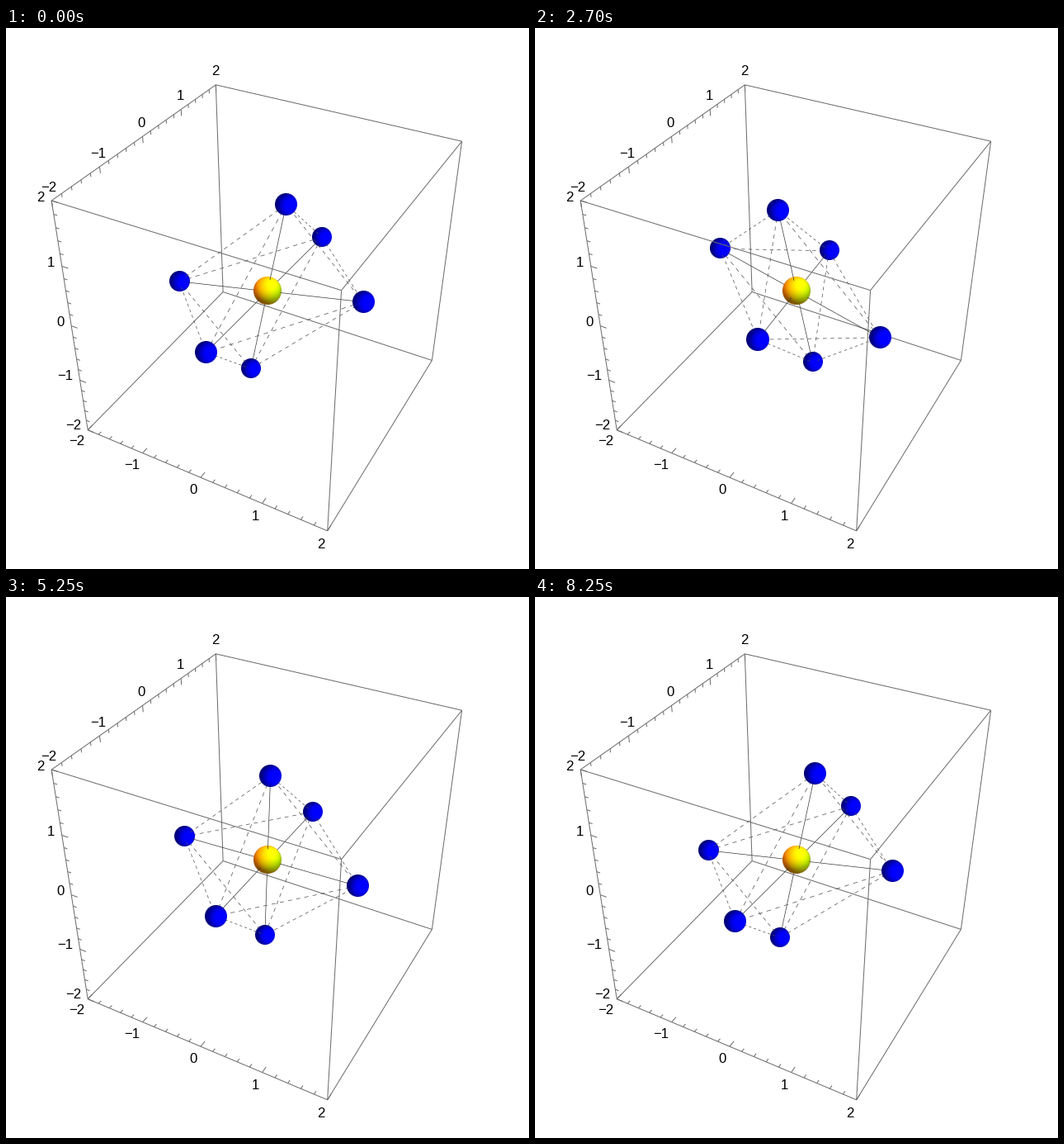
Animation of 634x655 px, one loop 9 s. Source, as a matplotlib script:

```python
import itertools

import matplotlib.pyplot as plt
import numpy as np
from matplotlib.animation import FuncAnimation

W, H, DPI = 634, 655, 64
PT = 72 / DPI                 # points per pixel
FRAMES, INTERVAL = 60, 150
HOLD, STEPS = 5, 49           # still frames at the start, steps of two swings
HALF = 2                      # the box runs from -HALF to HALF
ARM = np.sqrt(2)              # distance of an outer ball from the centre
SWING = 0.188                 # largest shear of an outer ball

plt.rcParams["font.family"] = "Liberation Sans"
plt.rcParams["lines.scale_dashes"] = False
plt.rcParams["lines.dash_capstyle"] = "butt"

# Camera looking at the origin, with the z axis upright
MIDDLE = np.array([317, 318.8])
SCALE = 83.5                  # pixels per unit at the origin
EYE = 2 * HALF * np.array([1.3, -2.4, 2])
FORWARD = EYE / np.linalg.norm(EYE)
RIGHT = np.cross((0, 0, 1), FORWARD)
RIGHT /= np.linalg.norm(RIGHT)
UP = np.cross(FORWARD, RIGHT)


def project(p):
    """Pixel position and relative distance from the eye."""
    depth = 1 - np.dot(p, FORWARD) / np.linalg.norm(EYE)
    offset = np.array([np.dot(p, RIGHT), -np.dot(p, UP)])
    return MIDDLE + SCALE * offset / depth, depth


LIGHTS = [                    # tint and direction towards the light
    ((0, .18, .5), (1.5, -.5, 1.5)),
    ((.18, .5, .18), (1.5, 1.5, 2.5)),
    ((.5, .18, 0), (-.5, 1.5, 1.5)),
    ((0, 0, .18), (-.5, -.5, 1.5)),
]
AMBIENT = (.5, .28, .36)


def ball_image(color, n=160):
    """Lit ball as an RGBA picture."""
    x, y = np.meshgrid(*[(np.arange(n) + .5) / n * 2 - 1] * 2)
    rho = np.hypot(x, y)
    k = 1 / np.maximum(rho, 1)
    normal = np.dstack([x * k, -y * k, np.sqrt(np.clip(1 - rho**2, 0, 1))])
    light = np.ones((n, n, 3)) * AMBIENT
    for tint, d in LIGHTS:
        facing = np.clip(normal @ (np.array(d) / np.linalg.norm(d)), 0, 1)
        light += facing[..., None] * np.array(tint)
    rgb = np.clip(light * color, 0, 1)
    return np.dstack([rgb, (rho <= 1).astype(float)])


fig = plt.figure(figsize=(W / DPI, H / DPI), dpi=DPI, facecolor="white")
ax = fig.add_axes([0, 0, 1, 1])
ax.axis("off")


def draw_line(a, b, color=".42", width=1.0, z=0):
    return ax.plot([a[0], b[0]], [a[1], b[1]], color=color, lw=width * PT,
                   solid_capstyle="butt", zorder=z)[0]


def draw_box():
    corners = list(itertools.product((-HALF, HALF), repeat=3))
    nearest = min(corners, key=lambda c: project(c)[1])
    for a, b in itertools.combinations(corners, 2):
        if sum(i != j for i, j in zip(a, b)) == 1:
            draw_line(project(a)[0], project(b)[0], z=20 if nearest in (a, b) else 0)


def draw_label(value, edge, out):
    """Number beside an edge point, its own size pushing it outwards."""
    text = str(value).replace("-", "\u2212")
    half_size = np.array([4.8 * len(text), 8])
    x, y = edge + out * (9.5 + half_size)
    ax.text(x, y + 6, text, color="black", fontsize=16.7 * PT,
            ha="center", va="baseline", zorder=21)


def draw_axis(axis, edge, inward):
    """Ticks along one edge, pointing inward, with labels on the other side."""
    for i in range(-5 * HALF, 5 * HALF + 1):
        p = np.array(edge, float)
        p[axis] = i / 5
        a = project(p)[0]
        d = project(p + np.array(inward) * .1)[0] - a
        d /= np.hypot(*d)
        major = i % 5 == 0
        draw_line(a, a + d * (8 if major else 4.5))
        if major:
            draw_label(i // 5, a, -d)


draw_box()
draw_axis(0, (0, -HALF, -HALF), (0, 1, 0))
draw_axis(1, (-HALF, 0, HALF), (0, 0, -1))
draw_axis(2, (-HALF, -HALF, 0), (1, 0, 0))


class Ball:
    def __init__(self, color, radius):
        self.radius = radius
        self.image = ax.imshow(ball_image(color), aspect="auto")

    def move(self, p):
        self.p = np.array(p, float)
        self.xy, self.depth = project(self.p)
        (x, y), r = self.xy, SCALE * self.radius / self.depth
        self.image.set_extent((x - r, x + r, y + r, y - r))
        self.image.set_zorder(10 - self.depth)


class Rod:
    """Line between the surfaces of two balls."""

    def __init__(self, a, b, dashed):
        self.a, self.b, self.dashed = a, b, dashed
        self.line = draw_line((0, 0), (0, 0), ".3" if dashed else ".22", .7)

    def update(self):
        a, b = self.a, self.b
        d = (b.p - a.p) / np.linalg.norm(b.p - a.p)
        start = project(a.p + d * a.radius)[0]
        end = project(b.p - d * b.radius)[0]
        self.line.set_data([start[0], end[0]], [start[1], end[1]])
        self.line.set_zorder(10 - (a.depth + b.depth) / 2)
        if self.dashed:
            # foreshortened edges get shorter dashes
            dash = (2 + .0175 * np.hypot(*(b.xy - a.xy))) * PT
            skip = np.hypot(*(start - a.xy)) * PT
            self.line.set_linestyle((skip, (dash, dash)))


center = Ball((1, 1, 0), .2)
center.move((0, 0, 0))
sites = [(axis, sign) for axis in range(3) for sign in (1, -1)]
balls = [Ball((0, 0, 1), .15) for _ in sites]
rods = [Rod(center, ball, False) for ball in balls]
rods += [Rod(balls[i], balls[j], True)
         for i, j in itertools.combinations(range(6), 2)
         if sites[i][0] != sites[j][0]]

ax.set_xlim(0, W)
ax.set_ylim(H, 0)


def update(n):
    step = min(max(n - HOLD, 0), STEPS)
    shear = SWING * np.cos(4 * np.pi * step / STEPS)
    for ball, (axis, sign) in zip(balls, sites):
        p = np.full(3, shear)
        p[axis] = ARM
        ball.move(sign * p)
    for rod in rods:
        rod.update()
    return []


anim = FuncAnimation(fig, update, frames=FRAMES, interval=INTERVAL,
                     init_func=lambda: update(0), repeat=True, repeat_delay=0)
plt.show()
```
